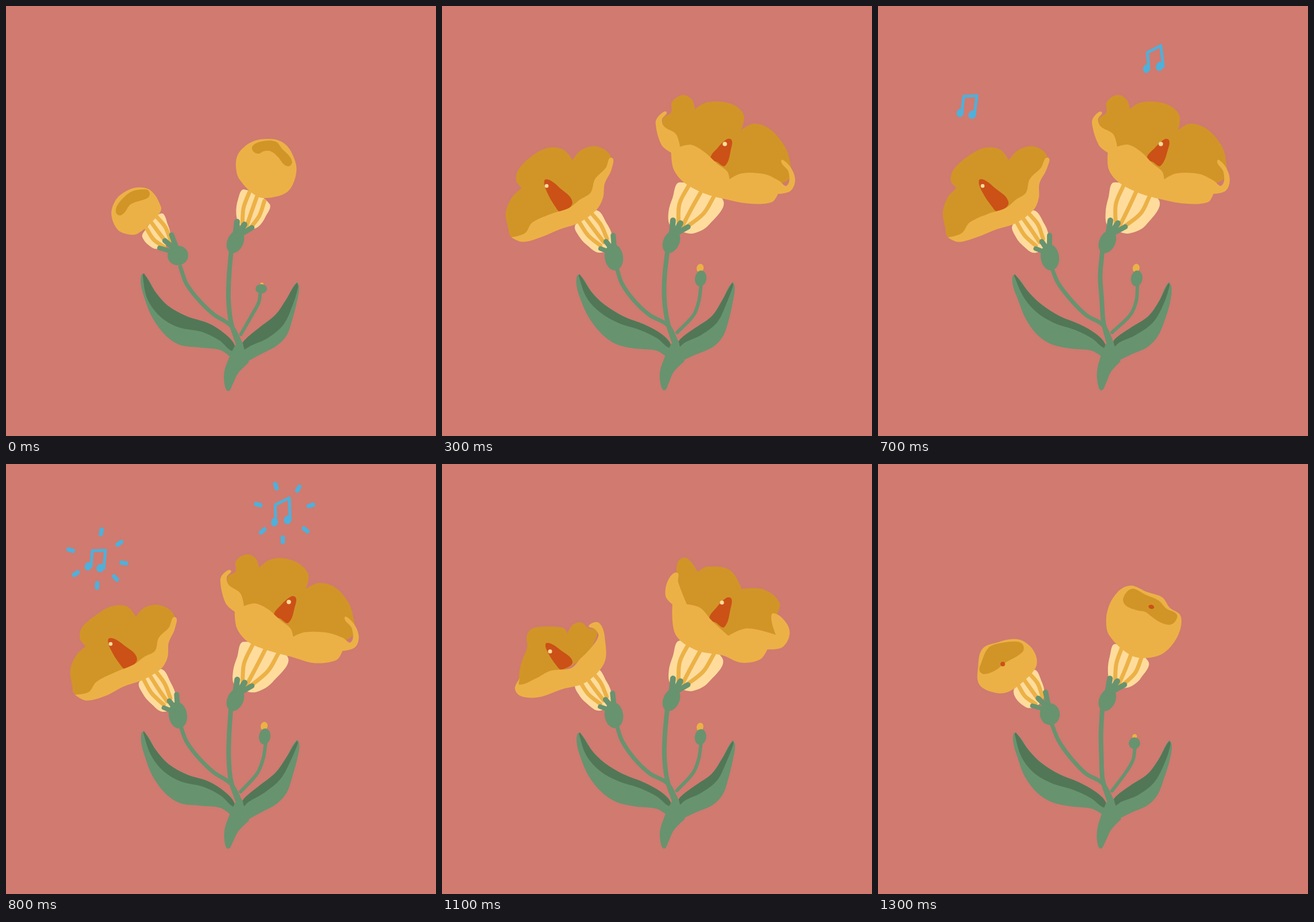
An HTML page that plays this animation: 748x748 px, repeating every 1.4 s.

```html
<!DOCTYPE html>
<html lang="en">
<head>
<meta charset="utf-8">
<title>Singing flowers</title>
<style>
html, body { margin: 0; height: 100%; overflow: hidden; background: #d07a70; }
svg { display: block; width: 100vw; height: 100vh; }
path { stroke-linecap: round; stroke-linejoin: round; }
</style>
</head>
<body>
<svg id="stage" viewBox="0 0 748 748"></svg>
<script>
const GREEN = '#68936f', DARK = '#527756', GOLD = '#ecb146', OCHRE = '#d19527';
const CREAM = '#ffdc9c', RED = '#cb5117', BLUE = '#4fb0da';

let seed = 0; // changes the hand-drawn wobble of each drawing

// "x,y x,y ..." to points; "!" marks a sharp corner.
const parse = text => text.split(' ').map(word => {
  const [x, y] = word.split(',').map(parseFloat);
  return { x, y, sharp: word.endsWith('!') };
});
const num = (a, b, k) => a + (b - a) * k;
const mix = (p, q, k) => ({ x: num(p.x, q.x, k), y: num(p.y, q.y, k), sharp: p.sharp });
const morph = (from, to, k) => {
  const end = parse(to);
  return parse(from).map((p, i) => mix(p, end[i], k));
};
const wobble = p => ({
  x: p.x + 1.2 * Math.sin(p.y * 0.045 + seed * 2.3),
  y: p.y + 1.2 * Math.sin(p.x * 0.05 + seed * 3.1),
  sharp: p.sharp
});

// Smooth curve through the points, with handles in proportion to each segment.
function curve(points, loop) {
  const pts = points.map(wobble), n = pts.length;
  const at = i => pts[loop ? (i + n) % n : Math.max(0, Math.min(n - 1, i))];
  const tangent = i => {
    if (at(i).sharp) return { x: 0, y: 0 };
    const a = at(i - 1), b = at(i + 1);
    const len = Math.hypot(b.x - a.x, b.y - a.y) || 1;
    return { x: (b.x - a.x) / len, y: (b.y - a.y) / len };
  };
  let d = `M${pts[0].x} ${pts[0].y}`;
  for (let i = 0; i < (loop ? n : n - 1); i++) {
    const p = at(i), q = at(i + 1), s = tangent(i), t = tangent(i + 1);
    const h = Math.hypot(q.x - p.x, q.y - p.y) / 3;
    d += `C${p.x + s.x * h} ${p.y + s.y * h} ${q.x - t.x * h} ${q.y - t.y * h} ${q.x} ${q.y}`;
  }
  return d;
}

const points = shape => typeof shape === 'string' ? parse(shape) : shape;
const blob = (color, shape) => `<path d="${curve(points(shape), true)}Z" fill="${color}"/>`;
const line = (color, width, shape) =>
  `<path d="${curve(points(shape), false)}" fill="none" stroke="${color}" stroke-width="${width}"/>`;
const oval = (color, x, y, rx, ry = rx, turn = 0) =>
  `<ellipse rx="${rx}" ry="${ry}" fill="${color}" transform="translate(${x} ${y}) rotate(${turn})"/>`;
const place = (art, x, y, toX, toY, sx, sy = sx) =>
  `<g transform="translate(${toX} ${toY}) scale(${sx} ${sy}) translate(${-x} ${-y})">${art}</g>`;

// A leaf is its lower edge joined to the upper one, with a shadow band below the upper.
function leaf(lower, upper, band, depth) {
  const top = parse(upper), low = parse(band);
  const shade = top.map((p, i) => mix(p, low[i], depth));
  return blob(GREEN, [...parse(lower), ...top.slice(1).reverse()])
    + blob(DARK, [...top, ...shade.reverse()]);
}

function plant(w) {
  const depth = num(1, 0.65, w);
  return leaf(
    '238,467 234,482 243,512 256,543 277,572 302,589 335,595 372,599 392,612!',
    '239,466 262,499 284,521 316,540 352,553 380,570 396,588',
    '237,470 247,510 270,540 300,558 340,568 370,582 394,600', depth)
    + leaf(
    '505,481 510,490 507,515 499,545 488,573 470,592 440,607 415,621 401,637!',
    '505,482 488,512 470,538 440,560 414,580 407,594',
    '508,488 500,520 483,555 455,578 425,590 412,597', depth)
    + blob(GREEN, '398,588! 387,612 380,637 382,661 388,669 395,658 404,638 422,619! 411,588!')
    + line(GREEN, 7, '302,453 313,482 335,511 362,537 392,556 408,588')
    + line(GREEN, 8, '391,428 387,470 388,510 392,550 402,585')
    + line(GREEN, 6, morph('443,497 441,515 430,535 408,570', '451,487 448,513 438,538 408,569', w))
    + oval(GOLD, num(445, 449, w), num(484, 456, w), num(3, 6, w), num(3, 7.5, w), 15)
    + oval(GREEN, num(444, 450, w), num(492, 474, w), 10, num(8, 14, w), 8 * w);
}

// Striped cup: the stripes run from the rim to the foot and bulge outwards.
function cup(outline, left, right) {
  const rimL = outline[0], rimR = outline[outline.length - 1];
  const stripes = [0.2, 0.5, 0.8].map(f => {
    const top = mix(rimL, rimR, f), foot = mix(left, right, f), mid = mix(top, foot, 0.5);
    mid.x += (f - 0.5) * 0.3 * (rimR.x - rimL.x);
    mid.y += (f - 0.5) * 0.3 * (rimR.y - rimL.y);
    return line(GOLD, 7, [top, mid, foot]);
  });
  return blob(CREAM, outline) + stripes.join('');
}

function leftCup(w) {
  return cup(morph(
    '240,395 238,403 248,416 262,422 280,414 287,400 283,380 270,360',
    '233,380 240,402 254,418 271,430 288,424 296,403 288,380 268,356', w),
    { x: 271, y: 422 }, { x: 291, y: 402 })
    + oval(GREEN, 299, num(434, 437, w), num(18, 16, w), num(17, 23, w), -8)
    + line(GREEN, 9, morph('298,425 289,397', '299,425 298,400', w))
    + line(GREEN, 9, morph('296,425 277,407', '293,422 285,411', w))
    + line(GREEN, 8, morph('288,426 267,420', '290,429 275,423', w));
}

function rightCup(w) {
  return cup(morph(
    '413,318 403,335 401,360 408,380 424,388 440,384 452,368 458,345',
    '413,308 401,335 395,360 398,383 416,393 437,396 465,380 488,335', w),
    { x: 408, y: 382 }, { x: 430, y: 387 })
    + oval(GREEN, 399, 410, 14, 21, 24)
    + line(GREEN, 10, '400,398 403,374')
    + line(GREEN, 10, '404,398 416,379')
    + line(GREEN, 9, '406,398 429,385');
}

const leftRed = () => blob(RED, '177,304 186,303 202,314 227,340 208,357 198,349 181,322');
const rightRed = () => blob(RED, '497,231 505,233 504,247 492,277 478,270 467,264 480,246');

// Bud heads, from shut (k = 0) to bell (k = 1).
function leftBell(k) {
  return blob(GOLD, morph(
    '226,317 245,318 258,328 267,343 270,354 258,372 230,397 212,398 195,389 184,362 190,338 206,324',
    '237,289 256,293 275,310 283,332 277,355 255,377 225,393 195,397 156,380 161,345 172,305 215,293', k))
    + blob(OCHRE, morph(
    '244,320 249,326 246,334 217,346 207,360 199,365 192,360 193,348 204,334 220,323',
    '240,295 256,302 256,318 222,345 200,357 168,368 158,362 163,345 178,306 200,299', k));
}

function rightBell(k) {
  return blob(GOLD, morph(
    '450,232 472,234 490,244 502,265 505,285 498,310 486,326 462,334 436,331 405,300 400,278 404,258 418,242 434,234',
    '436,191 460,208 498,217 514,233 552,244 550,285 510,328 475,339 440,335 401,298 396,265 402,230 415,203 425,193', k))
    + blob(OCHRE, morph(
    '445,236 470,237 482,250 494,262 498,272 493,279 484,277 474,264 462,254 450,253 440,257 431,252 430,243',
    '435,198 458,215 495,222 510,238 545,251 546,268 535,282 512,286 494,276 482,260 465,252 432,242 422,225', k));
}

function bud(k, w) {
  let art = plant(w) + leftCup(w) + leftBell(k) + rightCup(w) + rightBell(k);
  if (k === 1) {
    art += place(leftRed(), 202, 330, 213, 341, 0.4) + oval(CREAM, 206, 337, 3.5)
      + place(rightRed(), 486, 254, 473, 254, 0.58) + oval(CREAM, 475, 244, 3.5);
  } else if (k > 0) {
    art += oval(RED, 217, 348, 4) + oval(RED, 475.5, 248.5, 5, 3.5, 15);
  }
  return art;
}

function bloom() {
  return plant(1) + leftCup(1)
    + blob(OCHRE, '128,304 132,285 157,262 185,247 212,249 227,267! 243,250 270,245 293,261 290,285 262,330 200,368 150,398 122,402 116,385 112,358 122,332 138,317!')
    + leftRed() + oval(CREAM, 182, 313, 3.3)
    + blob(GOLD, '295,265 294,285 282,310 280,335 270,355 240,376 205,388 175,402 140,411 121,402! 145,396 158,378 190,362 222,350 240,336 258,325 265,302 284,283')
    + rightCup(1)
    + blob(OCHRE, '398,186 399,168 418,156 434,164 439,180! 456,168 480,165 508,173 525,192 521,217! 542,206 568,212 592,235 604,262 602,300 555,310 490,296 430,270 395,235 384,198')
    + rightRed() + oval(CREAM, 492, 240, 3.8)
    + blob(GOLD, '372,203 378,190 390,185 383,197 387,210 408,224 415,246! 435,242 458,254 478,273 495,287 499,301! 520,292 560,293 585,303 599,311 602,288 590,268 604,277 613,300 606,320 584,326! 574,341 535,345 495,336 455,325 420,308 402,285 399,256! 383,242');
}

function folding() {
  return plant(0.95) + leftCup(0.95)
    + blob(OCHRE, '147,320 147,298 160,286 210,284 217,294! 228,278 243,275 255,286 270,290 250,330 200,365 138,386 135,368 139,343')
    + place(leftRed(), 202, 357, 203, 357, 0.95, 0.82) + oval(CREAM, 188, 326, 3.5)
    + blob(GOLD, '255,281 274,278 283,312 282,348 250,380 210,391 168,407 138,404 128,390 137,373! 136,384 165,374 190,360 225,354 240,338 256,322 271,300 266,288')
    + rightCup(0.95)
    + blob(OCHRE, '408,192 409,172 420,164 431,170 444,188! 460,178 500,184 522,218! 560,219 588,240 583,265 580,296 500,305 430,270')
    + place(rightRed(), 486, 254, 485, 257, 1.03, 1.1) + oval(CREAM, 487, 241, 3.5)
    + blob(GOLD, '408,190 411,207 427,245! 450,250 470,272 497,298! 530,287 580,297! 574,262 590,265 604,290 592,317 565,323! 553,341 520,346 488,332 440,324 405,297 402,245! 390,230 393,203');
}

function trails(dy) {
  const art = line(BLUE, 6, '161,189 152,212 153,235 165,271')
    + line(BLUE, 6, '127,230 134,255 148,278')
    + line(BLUE, 7, '497,142 507,160 508,180 503,196')
    + line(BLUE, 7, '488,175 485,195 476,207');
  return place(art, 0, 0, 0, dy, 1);
}

function notes(dy) {
  const art = line(BLUE, 5, '147,177 150,150! 173,149! 169,180')
    + oval(BLUE, 143, 178, 6, 7.5, 20) + oval(BLUE, 164, 181, 6.5, 7.5, 30)
    + line(BLUE, 5, '470,100 468,72! 492,60! 495,96')
    + oval(BLUE, 467, 101, 6, 7.5, 10) + oval(BLUE, 490, 97, 6.5, 8, 20);
  return place(art, 0, 0, 0, dy, 1);
}

function sparks(x, y, radius, width, angles) {
  return angles.map(deg => {
    const a = deg * Math.PI / 180;
    const ends = [radius - 4, radius + 4].map(r => ({ x: x + r * Math.cos(a), y: y + r * Math.sin(a) }));
    return line(BLUE, width, ends);
  }).join('');
}
const burst = (radius, width) =>
  sparks(158, 163, radius, width, [-79, -32, 12, 48, 90, 143, 195])
  + sparks(484, 85, 48, width, [-109, -61, -17, 37, 92, 139, 198]);

const STEP = 100;
const scenes = [
  () => bud(0, 0),
  () => bud(0.48, 0.35),
  () => bud(1, 0.7),
  bloom,
  bloom,
  () => bloom() + trails(0),
  () => bloom() + trails(-53),
  () => bloom() + notes(8),
  () => bloom() + notes(0) + burst(47, 7.5),
  () => bloom() + burst(64, 5),
  bloom,
  folding,
  () => bud(1, 0.7),
  () => bud(0.48, 0.35)
];

const stage = document.getElementById('stage');
stage.innerHTML = scenes.map((scene, i) => {
  seed = i;
  return `<g display="none">${scene()}</g>`;
}).join('');
const layers = [...stage.children];
let shown = -1;

function show(time) {
  const i = Math.floor(time / STEP) % layers.length;
  if (i === shown) return;
  if (shown >= 0) layers[shown].setAttribute('display', 'none');
  layers[i].removeAttribute('display');
  shown = i;
}

const start = performance.now();
function tick() {
  show(performance.now() - start);
  requestAnimationFrame(tick);
}
tick();
</script>
</body>
</html>
```
